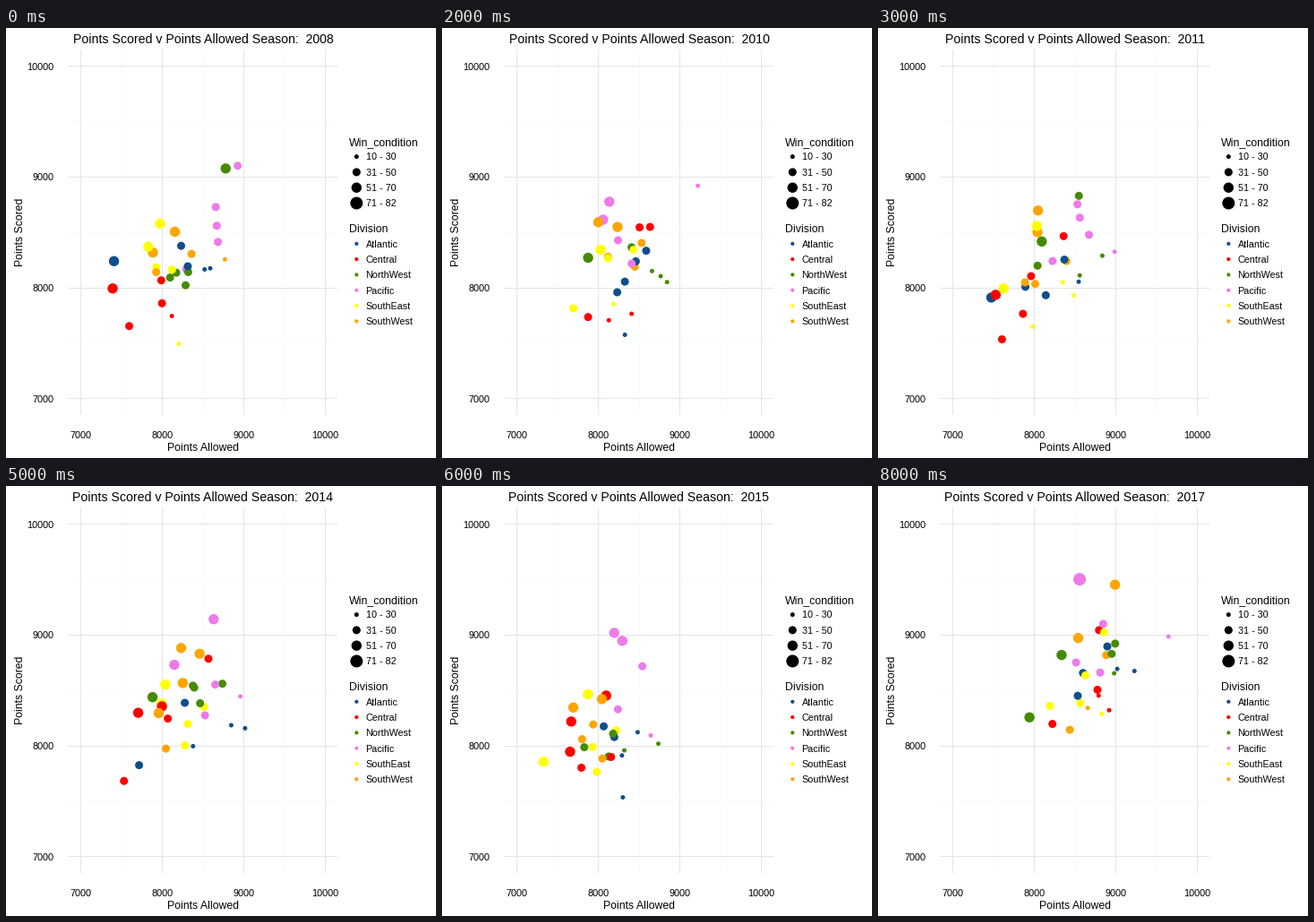
A matplotlib script for the animation above (9 s loop, 480 px wide and 480 px high).

```python
import matplotlib.pyplot as plt
import numpy as np
from matplotlib.animation import FuncAnimation

SIZE, DPI = 480, 100
PX = 72 / DPI  # points per pixel
GAMES = 82
TEAMS = 30
LEFT, RIGHT, TOP, BOTTOM = 69, 370, 24, 432

# division: colour, usual pace and margin relative to the league
DIVISIONS = {
    "Atlantic": ("#104E8B", -0.5, -1),
    "Central": ("#FF0000", -1, 0),
    "NorthWest": ("#458B00", 0.5, 0),
    "Pacific": ("#EE7AE9", 3, 0),
    "SouthEast": ("#FFFF00", -1.5, 0),
    "SouthWest": ("#FFA500", -0.5, 2),
}
COLORS, PACE, MARGIN = zip(*DIVISIONS.values())

WIN_BINS = [31, 51, 71]
RADII = np.array([2.5, 4.5, 5.7, 7.0])

# each division's standout: points allowed and scored per game
STANDOUTS = {
    2008: [(90.3, 100.5), (90.1, 97.5), (107, 110.7),
           (108.8, 111), (100, 91.4), (106.9, 100.7)],
    2009: [(107.8, 105.2), (91.4, 100.3), (94.1, 99.4),
           (112.3, 108.6), (103.5, 96.1), (99.3, 93.9)],
    2010: [(101.5, 92.4), (99.1, 94), (107.8, 98.2),
           (112.4, 108.8), (93.8, 95.3), (104, 102.5)],
    2011: [(91.1, 96.5), (92.7, 91.9), (107.7, 101.1),
           (105.7, 103.4), (97.3, 93.3), (98, 103.7)],
    2013: [(96.5, 93.2), (90.7, 94.7), (101.1, 106.1),
           (105.1, 100.2), (102.7, 93.4), (89.3, 93.4)],
    2014: [(109.9, 99.5), (91.8, 93.7), (106.5, 104.4),
           (109.2, 103), (97.4, 102.2), (103.1, 107.7)],
    2015: [(101.2, 91.9), (98.7, 103.1), (106.5, 97.8),
           (99.9, 110), (97.3, 94.7), (95.1, 98.3)],
    2016: [(107.6, 97.4), (98.3, 104.3), (102.9, 110.2),
           (104.1, 114.9), (98.4, 100), (92.9, 103.5)],
    2017: [(112.5, 105.8), (107.2, 110.3), (96.8, 100.7),
           (104.3, 115.9), (107.6, 101.1), (109.6, 115.3)],
}
YEARS = list(STANDOUTS)


def league_pace(year):
    return np.interp(year, [2008, 2010, 2013, 2014, 2015, 2017],
                     [100, 100.4, 98.1, 101, 100, 105.5])


def season(year):
    """Points allowed, points scored and dot radius of every team."""
    rng = np.random.default_rng(year)
    div = np.arange(TEAMS) % len(DIVISIONS)
    pace = league_pace(year) + np.take(PACE, div) + rng.normal(0, 2.4, TEAMS)
    margin = np.take(MARGIN, div) + rng.normal(0, 4, TEAMS)
    margin = np.clip(margin, -8, 8)
    games = np.column_stack([pace - margin / 2, pace + margin / 2])
    games[:len(DIVISIONS)] = STANDOUTS[year]
    allowed, scored = games.T
    wins = 41 + 2.8 * (scored - allowed)
    return allowed * GAMES, scored * GAMES, RADII[np.digitize(wins, WIN_BINS)]


def to_x(v):
    return 83.7 + 0.09105 * (v - 7000)


def to_y(v):
    return 42.7 + 0.1237 * (10000 - v)


plt.rcParams["font.family"] = "Liberation Sans"
fig = plt.figure(figsize=(SIZE / DPI, SIZE / DPI), dpi=DPI, facecolor="white")
ax = fig.add_axes([0, 0, 1, 1])
ax.set(xlim=(0, SIZE), ylim=(SIZE, 0))
ax.axis("off")


def text(x, y, s, size, ha="left", **kw):
    return ax.text(x, y, s, fontsize=size * PX, ha=ha, va="baseline",
                   color="black", **kw)


def area(radii):
    return (2 * np.asarray(radii) * PX) ** 2


def dots(x, y, radii, colors, z):
    return ax.scatter(x, y, s=area(radii), c=colors, linewidths=0,
                      zorder=z, snap=False)


def grid(values, color, z):
    for v in values:
        x, y = int(to_x(v)) + 0.5, int(to_y(v)) + 0.5
        for xs, ys in (((x, x), (TOP, BOTTOM)), ((LEFT, RIGHT), (y, y))):
            ax.plot(xs, ys, color=color, lw=PX, zorder=z, snap=False,
                    solid_capstyle="butt")


def legend(y, name, labels, radii, colors):
    text(382.8, y, name, 12.3)
    rows = y + 13 + 17.3 * np.arange(len(labels))
    dots(np.full(len(labels), 391.3), rows, radii, colors, 3)
    for row, label in zip(rows, labels):
        text(401.6, row + 3.8, label, 10.8)


grid(range(7500, 10000, 1000), "#FAFAFA", 1)
grid(range(7000, 10001, 1000), "#E5E5E5", 2)
for v in range(7000, 10001, 1000):
    text(to_x(v) - 0.4, 457.6, str(v), 10.9, "center")
    text(53.3, to_y(v) + 4, str(v), 10.9, "right")

text(219.5, 472, "Points Allowed", 12.2, "center")
text(19.3, 227.4, "Points Scored", 12.2, "center",
     rotation=90, rotation_mode="anchor")
legend(130.6, "Win_condition", ["10 - 30", "31 - 50", "51 - 70", "71 - 82"],
       RADII, ["black"] * len(RADII))
legend(227.8, "Division", list(DIVISIONS), [2.1] * len(COLORS), COLORS)

title = text(220, 17, "", 14.1, "center")
points = dots(np.zeros(TEAMS), np.zeros(TEAMS), np.ones(TEAMS),
              COLORS * (TEAMS // len(COLORS)), 4)


def update(i):
    allowed, scored, radii = season(YEARS[i])
    title.set_text(f"Points Scored v Points Allowed Season:  {YEARS[i]}")
    points.set_offsets(np.column_stack([to_x(allowed), to_y(scored)]))
    points.set_sizes(area(radii))
    return title, points


anim = FuncAnimation(fig, update, frames=len(YEARS), interval=1000,
                     repeat=True, repeat_delay=0)
plt.show()
```
